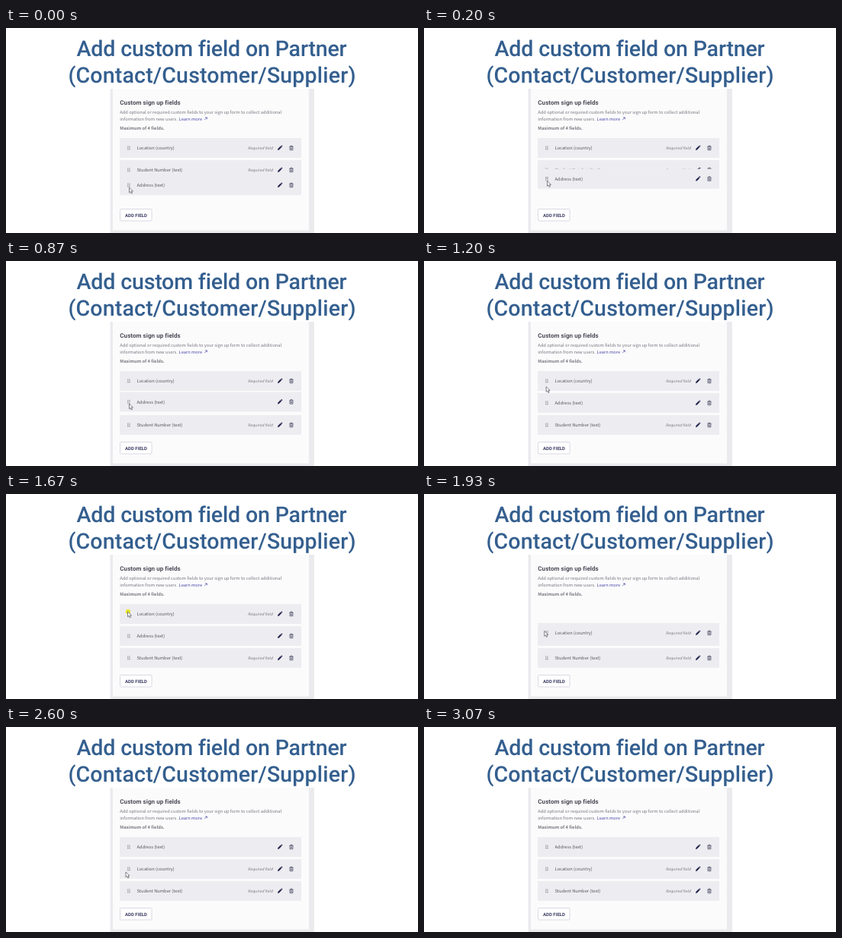
An HTML page for the animation above (3790 ms loop, 540x270 px).

```html
<!DOCTYPE html>
<html lang="en">
<head>
<meta charset="utf-8">
<title>Custom fields</title>
<style>
  html, body { margin: 0; width: 100%; height: 100%; overflow: hidden; background: #fff; }
  svg { display: block; width: 540px; height: 270px; }
  text { font-family: "Noto Sans CJK JP", "Noto Sans CJK SC", "Noto Sans CJK", "Open Sans", sans-serif; font-size: 5.74px; fill: #77777f; white-space: pre; text-rendering: geometricPrecision; }
  .title { font: 500 28.6px Roboto, sans-serif; fill: #345f8f; text-anchor: middle; }
  .head { font: 600 8px Roboto, sans-serif; fill: #4a4a56; letter-spacing: .06px; }
  .bold { font-weight: 700; font-size: 5.74px; }
  .link { fill: #4b4aa8; }
  .label { fill: #53535e; }
  .req { font-style: italic; font-size: 5.05px; }
  .button { font: 700 6px Roboto, sans-serif; fill: #3a3a62; }
</style>
</head>
<body>
<svg viewBox="0 0 540 270">
  <defs>
    <g id="tools">
      <rect x="149" y="-13" width="238" height="26" fill="#ededf1"/>
      <path d="M159.8-2.6v5.6M162-2.6v5.6" stroke="#777782" stroke-width="1.1" stroke-dasharray="1.1 .7"/>
      <path d="M356 2.9l.4-1.9 3.4-3.4 1.5 1.5-3.4 3.4zM360.2-2.8l.6-.5q.4-.3.8 0l.6.6q.4.4 0 .8l-.5.6z" fill="#25254f"/>
      <path d="M371.4-1.7h5.2M372.9-1.9v-.9h2.2v.9M372.1-1.5v4.2h3.8v-4.2M373.4-.3v1.9M374.6-.3v1.9" fill="none" stroke="#45455f" stroke-width=".75"/>
    </g>
  </defs>

  <text class="title" x="269.5" y="37.2" letter-spacing="-.2">Add custom field on Partner</text>
  <text class="title" x="270" y="72" letter-spacing=".14">(Contact/Customer/Supplier)</text>

  <rect x="136.5" y="80" width="267.5" height="190" fill="#ebebee"/>
  <rect x="140" y="80" width="257" height="186.5" fill="#fbfbfc"/>

  <text class="head" x="149.3" y="100.6">Custom sign up fields</text>
  <text x="149.3" y="112.6">Add optional or required custom fields to your sign up form to collect additional</text>
  <text x="149.3" y="121.5">information from new users.</text>
  <text class="link" x="226.6" y="121.5">Learn more</text>
  <path d="M260.2 121l3-3M261 117.8h2.4v2.4" fill="none" stroke="#4b4aa8" stroke-width=".7"/>
  <text class="bold" x="149.3" y="133.8">Maximum of 4 fields.</text>

  <g id="rows"></g>

  <rect x="149.5" y="238.5" width="41.5" height="15.5" rx="1" fill="#fff" stroke="#d6d6e0" stroke-width=".9"/>
  <text class="button" x="156" y="248.5">ADD FIELD</text>

  <circle id="click" cx="160" cy="155" r="3.2" fill="#e9e62f"/>
  <path id="cursor" d="M0 0v6.8l1.6-1.4 1.2 2.6 1.2-.6-1.1-2.5h2.1z" fill="#fff" stroke="#50505c" stroke-width=".7" stroke-linejoin="round"/>
</svg>
<script>
const LOOP = 3790, FPS = 15;
const $ = id => document.getElementById(id);
const slot = n => 158 + 29 * n;

// Smooth 0 to 1 between two times.
function ease(t, from, to) {
  const p = Math.min(1, Math.max(0, (t - from) / (to - from)));
  return p * p * (3 - 2 * p);
}

// Later rows lie on top; a dragged row hides the one it passes over.
const rows = [
  { name: 'Student Number (text)', required: true,
    y: t => slot(1 + ease(t, 530, 670)) },
  { name: 'Address (text)',
    y: t => slot(1 - ease(t, 1930, 2130)) + 20 - 21.5 * ease(t, 0, 470) + 1.5 * ease(t, 870, 1000) },
  { name: 'Location (country)', required: true,
    y: t => slot(0) + 37.5 * ease(t, 1670, 2100) - 8.5 * ease(t, 2400, 2600) }
];

// Drag up, travel to the top row, drag down, then speed off the stage.
function pointer(t) {
  const leave = Math.max(0, (t - 2600) / 400) ** 3;
  const travel = ease(t, 870, 1400), drag = ease(t, 1670, 2080);
  return [
    161.5 - 2 * travel - 2.5 * drag + 84 * leave,
    210 - 22 * ease(t, 0, 470) - 33 * travel + 36 * drag + 71 * leave
  ];
}

const place = (el, x, y) => el.setAttribute('transform', `translate(${x} ${y})`);

$('rows').innerHTML = rows.map(r => `<g><use href="#tools"/>
  <text class="label" x="171.6" y="2">${r.name}</text>
  ${r.required ? '<text class="req" x="316.8" y="2">Required field</text>' : ''}</g>`).join('');
const groups = [...$('rows').children];

function draw(now) {
  const t = Math.floor((now % LOOP + 5) * FPS / 1000) * 1000 / FPS;
  rows.forEach((r, i) => place(groups[i], 0, r.y(t)));
  place($('cursor'), ...pointer(t));
  $('click').style.display = t > 1660 && t < 1790 ? '' : 'none';
  requestAnimationFrame(() => draw(performance.now()));
}
draw(0);
</script>
</body>
</html>
```
